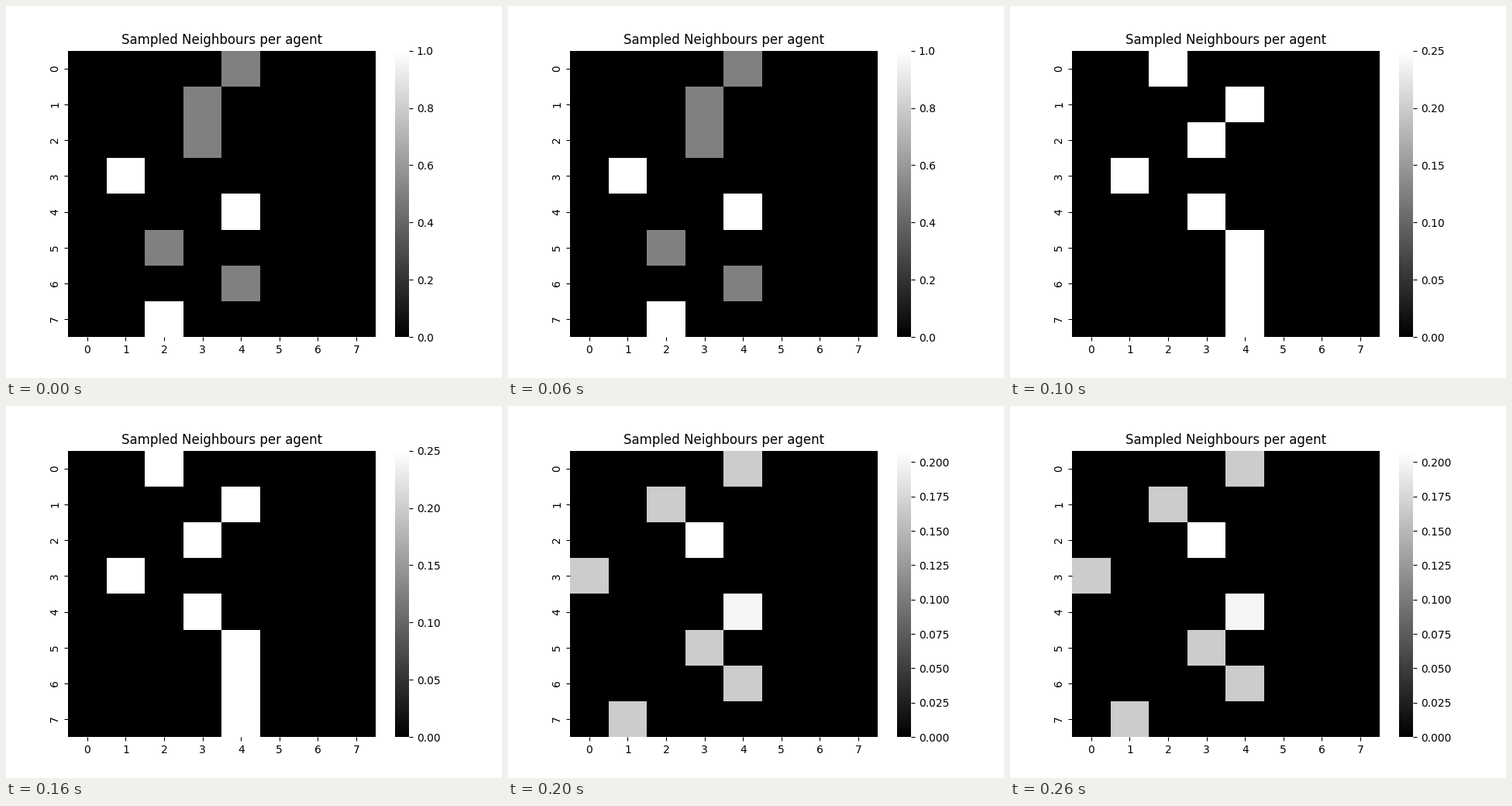
Recreate the animation shown at these times as a matplotlib script. Size 640x480 px, loop 0.3 s.

```python
import numpy as np
import matplotlib.pyplot as plt
from matplotlib.animation import FuncAnimation

SIZE = 8
TICKS = np.arange(SIZE) + 0.5

# Per step: the chosen neighbour of each agent and the weight of that choice.
STEPS = [
    ([4, 3, 3, 1, 4, 2, 4, 2], [1/2, 1/2, 1/2, 1, 1, 1/2, 1/2, 1]),
    ([2, 4, 3, 1, 3, 4, 4, 4], [1/4] * SIZE),
    ([4, 2, 3, 0, 4, 3, 4, 1], [1/6, 1/6, 5/24, 1/6, 1/5, 1/6, 1/6, 1/6]),
]


def weight_matrix(step):
    cols, weights = STEPS[step]
    grid = np.zeros((SIZE, SIZE))
    grid[np.arange(SIZE), cols] = weights
    return grid


fig, ax = plt.subplots(figsize=(6.4, 4.8), dpi=100)
mesh = ax.pcolormesh(weight_matrix(0), cmap="gray", vmin=0, vmax=1)
ax.set(xlim=(0, SIZE), ylim=(SIZE, 0))
ax.spines[:].set_visible(False)
ax.set_xticks(TICKS, range(SIZE))
ax.set_yticks(TICKS, range(SIZE), rotation="vertical", va="center")
ax.set_title("Sampled Neighbours per agent")
bar = fig.colorbar(mesh, ax=ax)
bar.outline.set_linewidth(0)


def update(step):
    grid = weight_matrix(step)
    mesh.set_array(grid)
    mesh.set_clim(0, grid.max())
    return [mesh]


anim = FuncAnimation(fig, update, frames=len(STEPS), interval=100,
                     repeat=True, repeat_delay=0, blit=False)
plt.show()
```
